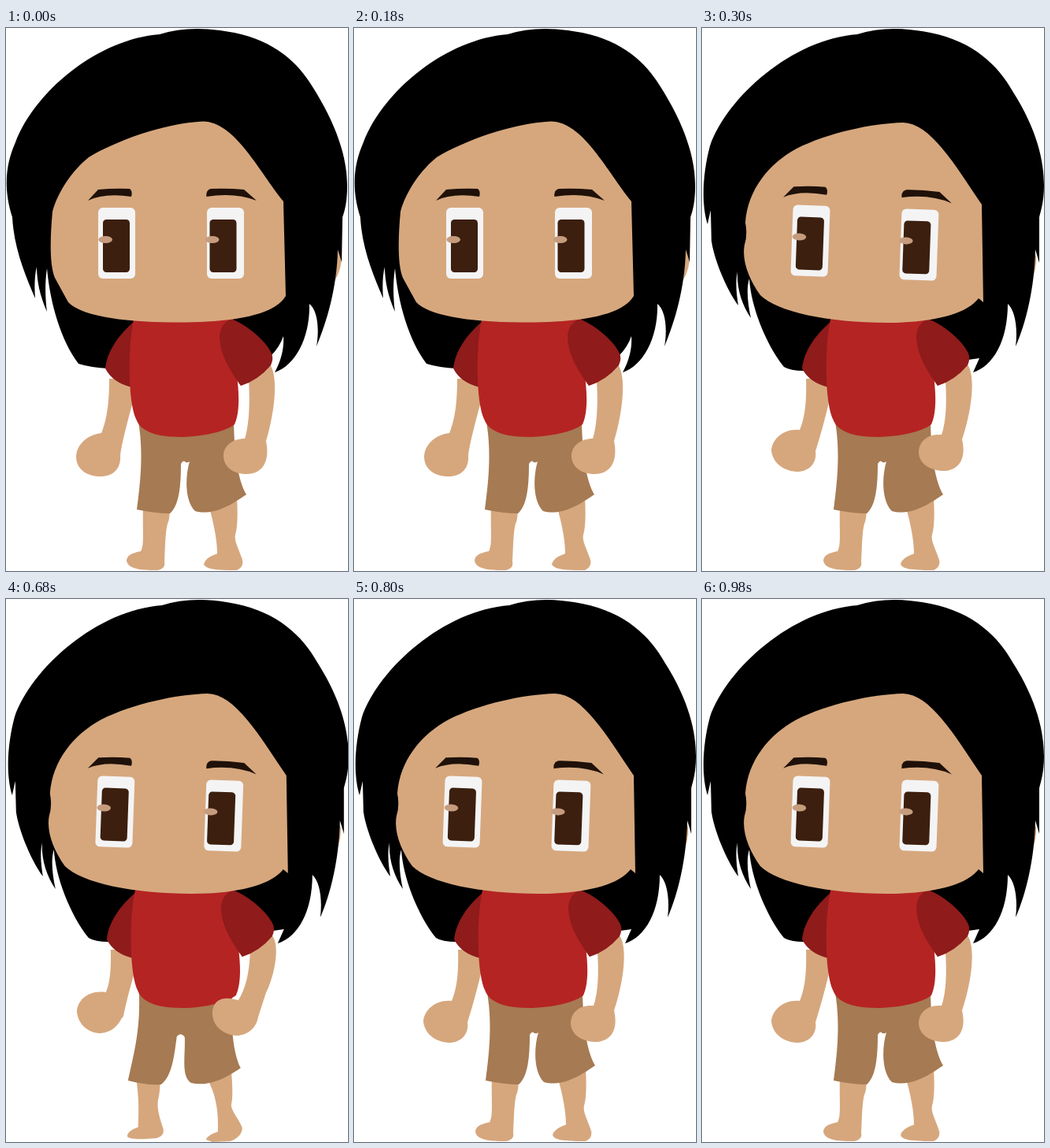
These frames come from a looping animation (434 px wide and 689 px high, 1100 ms). An HTML page:

```html
<!DOCTYPE html>
<html lang="en">
<head>
<meta charset="utf-8">
<title>Idle character</title>
<style>
  html, body { margin: 0; width: 100%; height: 100%; overflow: hidden; background: #fff; }
  svg { display: block; width: 100%; height: 100%; }
  .hair { fill: #000; }
  .skin { fill: #d6a77d; }
  .shirt { fill: #b42423; }
  .sleeve { fill: #8f1b1b; }
  .shorts { fill: #a67a52; }
  .white { fill: #f4f4f5; }
  .iris { fill: #3c1f0e; }
  .glint { fill: #c69c7e; }
  .brow { fill: #1f1109; }
</style>
</head>
<body>
<svg viewBox="0 0 434 689">
  <defs>
    <g id="eye">
      <rect class="white" x="117" y="228" width="47" height="90" rx="6"/>
    </g>
    <g id="pupil">
      <rect class="iris" x="123" y="243" width="34" height="67" rx="4.5"/>
      <ellipse class="glint" cx="126.2" cy="268.5" rx="8.8" ry="4.5"/>
    </g>
    <g id="features">
      <use href="#eye"/>
      <use href="#eye" x="138"/>
      <use href="#pupil"/>
      <use href="#pupil" x="135.5"/>
      <path class="brow" d="M104,219 L117,205 Q138,203 157,204 Q161,207 159,214 Q125,209 104,219Z"/>
      <path class="brow" d="M254.5,214 Q253,206 260,204 Q280,203 302,205 L318,219 Q290,208 254.5,214Z"/>
    </g>
  </defs>
  <path class="skin" id="ear"/>
  <path class="hair" id="hair"/>
  <path class="skin" id="legL"/>
  <path class="skin" id="legR"/>
  <path class="shorts" id="shorts"/>
  <path class="skin" id="armL"/>
  <g id="top">
    <path class="sleeve" d="M163,372 C142,390 128,411 126,432 Q135,450 160,456Z"/>
    <path class="shirt" d="M162,370 C155,400 154,472 165,496 C171,514 195,519 224,519 C255,518 280,511 290,503 C296,490 296,470 294,450 L288,365 L162,365Z"/>
  </g>
  <path class="skin" id="armR"/>
  <path class="sleeve" id="sleeveR" d="M288,370 C306,377 331,398 337,413 Q340,419 336,428 Q320,447 298,454 C285,435 271,415 271,390 Q273,375 284,370Z"/>
  <path class="skin" id="face"/>
  <use href="#features" id="look"/>
</svg>
<script>
const restHead = {
  ear: 'M417,275 L426,285 Q427,305 417,321Z',
  hair: 'M195,8 Q235,-5 290,6 C342,17 370,44 388,73 C420,123 433,165 433,200 C433,220 430,232 427,240 L426,297 L421,281 C420,330 407,373 394,404 C398,380 395,358 385,350 C386,392 368,428 341,437 C350,420 353,405 352,391 Q347,405 337,415 L325,420 L130,432 Q108,431 92,426 C70,397 56,350 52,305 C49,325 50,345 52,360 C43,340 39,320 39,303 C36,315 36,330 37,343 C25,315 10,280 8,240 C-4,203 0,172 12,145 C38,78 118,14 195,8Z',
  face: 'M59,233 C66,207 85,180 105,164 C140,143 200,121 250,118.5 C290,119 320,180 352,220 L355,340 C342,362 298,374 212,373.5 C140,373 95,364 79,348 L62,317 C55,300 56,265 59,233Z',
  look: ''
};
const tiltHead = {
  ear: 'M418,275 L424,290 Q425,305 418,321Z',
  hair: 'M197,8 Q237,-5 290,6 C345,17 376,48 394,80 C426,130 434,170 434,200 C434,220 430,232 428,240 L428,298 L423,281 C422,330 411,375 398,404 C401,380 397,358 388,350 C388,396 370,429 344,437 L352,419 L338,421 L325,415 L130,435 Q112,435 104,430 C80,400 62,352 60,318 C56,330 58,350 62,368 C50,350 44,330 45,309 C42,325 44,338 46,352 C30,330 15,292 12,270 L11,231 L7,249 C-2,220 2,180 10,150 C32,87 115,14 197,8Z',
  face: 'M55,247 C58,205 85,172 120,153 C160,133 215,121 255,120 C290,121 320,172 355,224 L357,348 L351,343 C335,364 290,374 235,374 C160,374 95,360 74,339 C60,320 50,295 54,275 Q58,263 55,247Z',
  look: 'translate(-3 -.5) rotate(2.07 209.5 273)'
};
const standing = {
  legL: 'M174,605 C173,640 176,655 171,664 Q153,667 153,676 C155,688 176,688 192,688 Q203,686 201,677 C202,660 202,640 205,629 Q208,624 208,605Z',
  legR: 'M257,605 C264,630 268,650 268,667 Q253,672 251,680 C253,688 274,688 293,688 Q302,684 300,675 C296,662 289,651 291,643 Q295,630 293,595Z',
  shorts: 'M168,500 C175,540 170,580 166,611 Q190,616 208,616 C220,606 222,580 222,553 Q225,547 228,551 Q231,552 233,550 C227,570 227,600 240,613 C265,620 290,602 305,592 C295,575 290,545 289,500Z'
};
const poses = {
  rest: {
    ...restHead, ...standing, shift: 0, headShift: 0,
    armL: 'M131,445 C131,480 127,500 121,514 C103,516 89,529 89,545 C90,562 105,569 120,569 C137,569 146,558 145,543 C146,532 150,515 160,478 L160,445Z',
    armR: 'M334,426 C345,438 343,480 330,524 C335,548 327,566 305,566 C289,566 276,557 276,543 C276,530 288,521 303,521 C308,505 310,480 308,448Z'
  },
  tilt: {
    ...tiltHead, ...standing, shift: 1, headShift: 0,
    armL: 'M131,445 C132,478 129,495 123,510 C102,508 88,522 87,536 C89,555 107,563 121,563 C137,562 145,550 143,537 C149,518 157,490 161,470 L161,445Z',
    armR: 'M335,426 C346,438 343,480 329,522 C335,548 324,562 304,562 C287,561 274,552 274,538 C275,522 287,515 303,516 C308,502 310,480 308,448Z'
  },
  sway: {
    ...tiltHead, shift: 1.8, headShift: .8,
    legL: 'M163,605 C168,640 166,655 166,670 Q152,675 152,682 C156,687 178,685 190,684 Q199,681 198,673 C194,660 188,645 192,632 Q194,622 194,605Z',
    legR: 'M253,608 C266,630 268,655 267,676 Q254,680 252,686 L260,689 L283,688 Q298,682 298,671 C294,660 284,650 284,642 Q287,630 284,598Z',
    shorts: 'M167,500 C169,545 161,575 153,611 C168,615 183,617 195,616 C210,605 212,575 215,555 Q220,549 225,556 C226,580 220,605 233,614 C258,620 283,604 296,595 C288,580 283,550 285,500Z',
    armL: 'M131,445 C132,475 129,490 125,499 C101,496 89,510 88,523 C90,543 106,551 118,551 C133,550 141,540 145,532 L147,530 C150,515 155,495 161,475 L161,445Z',
    armR: 'M335,426 C347,438 339,478 328,500 L318,531 C316,545 303,554 291,554 C274,553 260,542 260,525 C261,511 270,505 283,507 L293,509 C302,495 307,475 308,448Z'
  }
};
// [end time in ms, pose]
const steps = [[300, 'rest'], [500, 'tilt'], [800, 'sway'], [1100, 'tilt']];
const loop = 1100;
const headParts = ['ear', 'hair', 'face'];
const bodyParts = ['legL', 'legR', 'shorts', 'armL', 'armR'];
const el = id => document.getElementById(id);
const move = (id, x) => el(id).setAttribute('transform', `translate(${x} 0)`);

function show(name) {
  const p = poses[name];
  for (const id of [...headParts, ...bodyParts]) el(id).setAttribute('d', p[id]);
  for (const id of headParts) move(id, p.headShift);
  for (const id of [...bodyParts, 'top', 'sleeveR']) move(id, p.shift);
  el('look').setAttribute('transform', `translate(${p.headShift} 0) ${p.look}`);
}

const start = performance.now();
let current;
function tick() {
  const t = (performance.now() - start) % loop;
  const name = steps.find(([end]) => t < end)[1];
  if (name !== current) show(current = name);
  requestAnimationFrame(tick);
}
tick();
</script>
</body>
</html>
```
